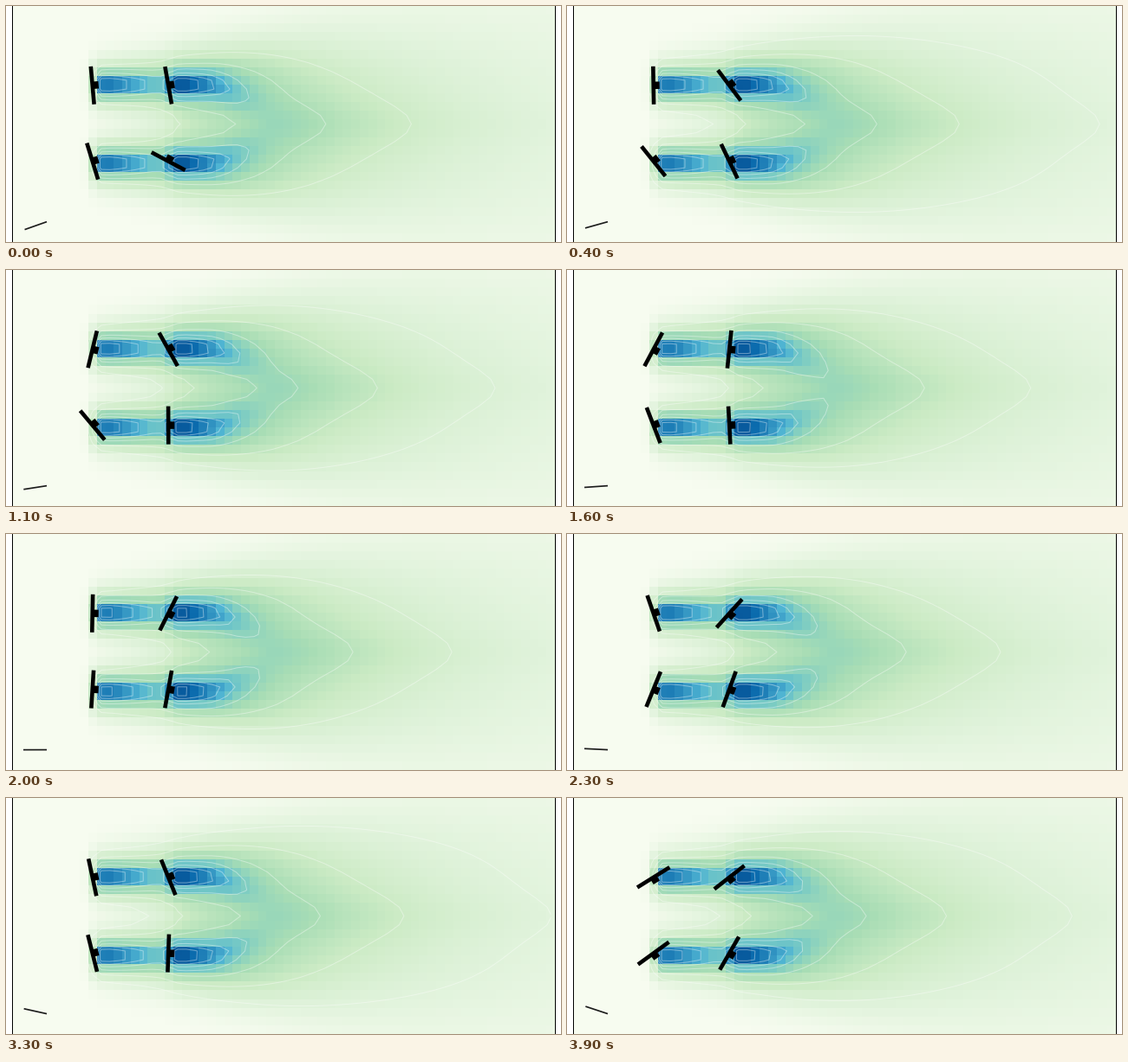
Recreate the animation shown at these times as a matplotlib script. Size 640x273 px, loop 4000 ms.

```python
import numpy as np
import matplotlib.pyplot as plt
from matplotlib.animation import FuncAnimation

W, H, DPI = 640, 273, 100
FRAMES, INTERVAL = 40, 100
LEFT, RIGHT = 7.3, 633.2
COLS, ROWS = 64, 27
PX = 72 / DPI

# Turbine hubs and their yaw in degrees at a few key steps
KEYS = [0, 7, 16, 23, 27, 33, 39]
TURBINES = [
    ((99.7, 91.8), [-5, 2, 28, -19, -37, -12, 58]),
    ((187.2, 91.8), [-10, -57, 6, 42, -28, -22, 52]),
    ((99.7, 179.6), [-17, -55, -21, 22, 25, -14, 54]),
    ((187.2, 179.6), [-62, 2, -3, 20, 30, 2, 30]),
]
BAR, NACELLE = 44, 7
MIN_LEVEL, LEVEL_STEP, LEVEL_RATE = .112, .12, .0039


def sigmoid(x, start, width):
    return 1 / (1 + np.exp(-(x - start) / width))


def smoothstep(t):
    t = np.clip(t, 0, 1)
    return t * t * (3 - 2 * t)


def bell(d, sigma):
    return np.exp(-d ** 2 / (2 * sigma ** 2))


def wake_field(x, y):
    """Velocity deficit: each row sheds a wide wake and a core that bends inward."""
    run = np.clip(x - 95, 0, None)
    spread = 18 + .056 * run + .00024 * run ** 2
    decay = 1 + (np.clip(x - 190, 0, None) / 157) ** 2
    wide = (.42 * sigmoid(x, 99, 3) + .09 * sigmoid(x, 190, 4)) / decay

    front = .5 * sigmoid(x, 104, 2) * np.exp(-((x - 105) / 60) ** 2)
    back = sigmoid(x, 188, 4) * (.44 * np.exp(-((x - 195) / 52) ** 2) + .06 / decay)
    core_spread = 8.5 + 10 * smoothstep((x - 210) / 120)
    offset = H / 6 * (1 - smoothstep((x - 230) / 120))

    total = 0
    for side in (-1, 1):
        dy = y[:, None] - H / 2
        total = total + wide * bell(dy - side * H / 6, spread)
        total = total + (front + back) * bell(dy - side * offset, core_spread)
    return total


fig = plt.figure(figsize=(W / DPI, H / DPI), dpi=DPI, facecolor="white")
ax = fig.add_axes([0, 0, 1, 1])
ax.set_xlim(0, W)
ax.set_ylim(H, 0)
ax.axis("off")

xs = LEFT + (np.arange(COLS) + .5) * (RIGHT - LEFT) / COLS
ys = (np.arange(ROWS) + .5) * H / ROWS
field = wake_field(xs, ys)
ax.imshow(field, cmap="GnBu", vmin=0, vmax=1, extent=(LEFT, RIGHT, H, 0),
          interpolation="nearest", aspect="auto")
for edge in (LEFT, RIGHT):
    ax.plot([edge, edge], [-5, H + 5], color="black", lw=PX)


def stroke(width, color="black"):
    return ax.plot([], [], color=color, lw=width * PX,
                   solid_capstyle="butt", zorder=5)[0]


bars = [stroke(4.6) for _ in TURBINES]
nacelles = [stroke(8.5) for _ in TURBINES]
vane = stroke(1.7, "#1c1c1c")
contours = []


def update(i):
    while contours:
        contours.pop().remove()
    levels = np.arange(MIN_LEVEL + LEVEL_RATE * i - LEVEL_STEP, .95, LEVEL_STEP)
    contours.append(ax.contour(xs, ys, field, levels=levels[levels > MIN_LEVEL + .003],
                               colors="white", alpha=.38, linewidths=.75, zorder=3))

    for ((x, y), yaws), bar, nacelle in zip(TURBINES, bars, nacelles):
        a = np.radians(np.interp(i, KEYS, yaws))
        c, s = np.cos(a), np.sin(a)
        half = BAR / 2
        bar.set_data([x + half * s, x - half * s], [y - half * c, y + half * c])
        nacelle.set_data([x, x + NACELLE * c], [y, y + NACELLE * s])

    wind = np.radians(19.5 - .97 * i)
    vane.set_data([47 - 27 * np.cos(wind), 47],
                  [249.6 + 27 * np.sin(wind), 249.6])
    return bars + nacelles + [vane]


anim = FuncAnimation(fig, update, frames=FRAMES, interval=INTERVAL,
                     repeat=True, blit=False, cache_frame_data=False)
plt.show()
```
